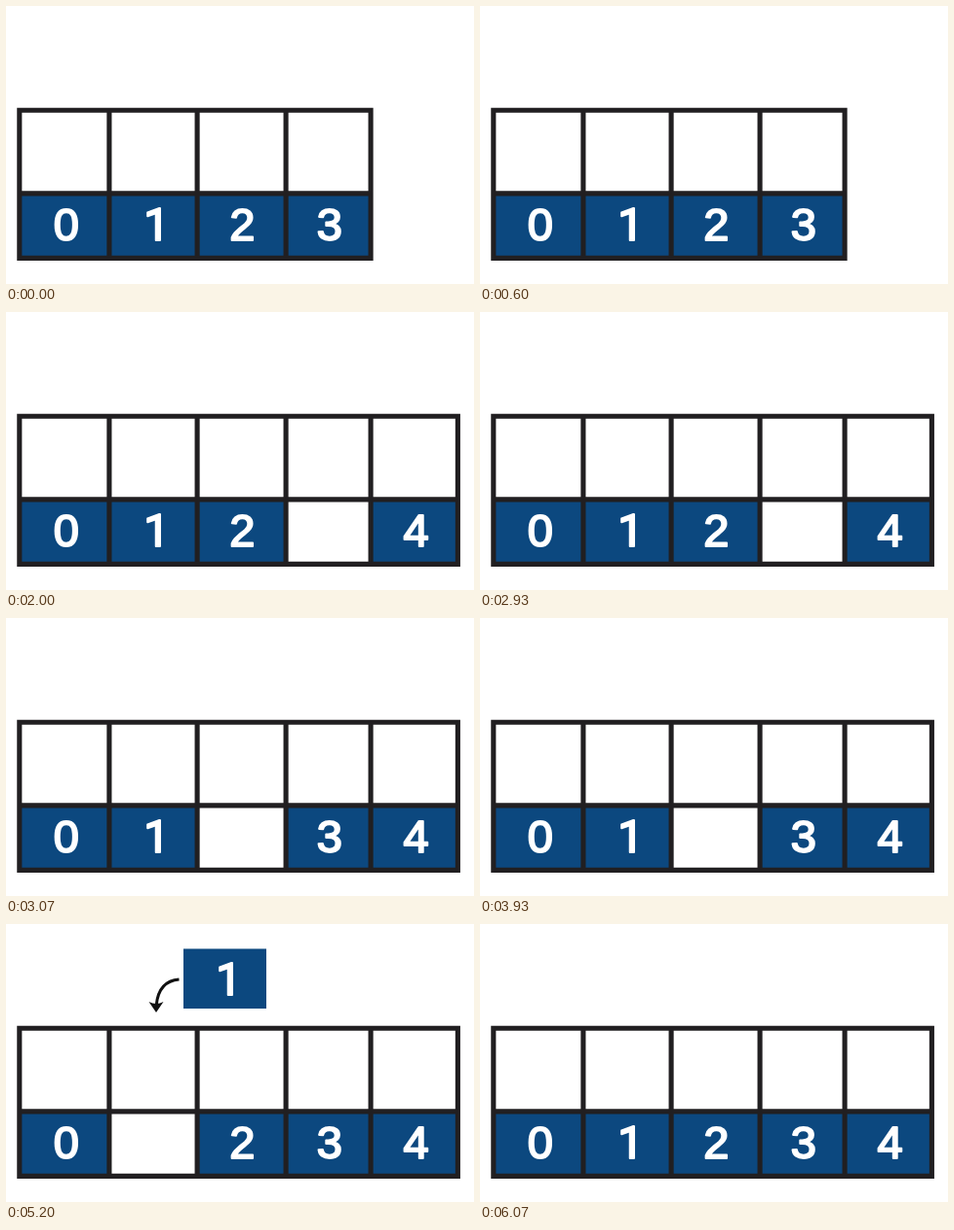
Animation of 480 by 286 pixels, one loop 6.99 s. Source, as an HTML page with a canvas:

```html
<!DOCTYPE html>
<html lang="en">
<head>
<meta charset="utf-8">
<title>Inserting into an array</title>
<style>
html, body { margin: 0; width: 100%; height: 100%; overflow: hidden; background: #fff; }
canvas { display: block; }
</style>
</head>
<body>
<canvas id="stage" width="480" height="286"></canvas>
<script>
const ctx = document.getElementById('stage').getContext('2d');
const LOOP = 6990;
const INK = '#211f21', BLUE = '#0c487f';
const walls = [13.8, 105.9, 196.1, 287.1, 374.1, 463.4];
const rows = [107.2, 192.9, 259.4];
const centers = [61.7, 151.2, 242.2, 331.8, 420.6];
const LINE = 5.1;

// Cell contents from each moment on; a dash is an empty cell.
const steps = [
  [0, '0123'],
  [1000, '0123-'],
  [2000, '012-4'],
  [3000, '01-34'],
  [4000, '0-234'],
  [6000, '01234']
];

function digit(d, x, base) {
  ctx.font = d === '1' ? '47px Roboto, sans-serif'
                       : '47px "Liberation Sans", Arial, sans-serif';
  const m = ctx.measureText(d);
  const left = x - (m.actualBoundingBoxRight - m.actualBoundingBoxLeft) / 2;
  ctx.fillStyle = ctx.strokeStyle = '#fff';
  ctx.lineWidth = 2;
  ctx.lineJoin = 'round';
  ctx.fillText(d, left, base);
  ctx.strokeText(d, left, base);
}

function tile(x, y, w, h) {
  ctx.fillStyle = BLUE;
  ctx.fillRect(x, y, w, h);
}

function grid(cols) {
  const left = walls[0], right = walls[cols];
  const [top, mid, bottom] = rows;
  ctx.strokeStyle = INK;
  ctx.lineWidth = LINE;
  ctx.lineJoin = 'miter';
  ctx.beginPath();
  ctx.rect(left, top, right - left, bottom - top);
  ctx.moveTo(left, mid);
  ctx.lineTo(right, mid);
  for (let i = 1; i < cols; i++) {
    ctx.moveTo(walls[i], top);
    ctx.lineTo(walls[i], bottom);
  }
  ctx.stroke();
}

function arrow() {
  ctx.strokeStyle = ctx.fillStyle = '#111';
  ctx.lineWidth = 3;
  ctx.beginPath();
  ctx.moveTo(177.5, 57);
  ctx.bezierCurveTo(165, 58, 156, 66, 154.3, 83);
  ctx.stroke();
  ctx.beginPath();
  ctx.moveTo(146.5, 80);
  ctx.quadraticCurveTo(154, 84, 161.5, 80);
  ctx.lineTo(154, 91);
  ctx.fill();
}

function draw(t) {
  ctx.fillStyle = '#fff';
  ctx.fillRect(0, 0, 480, 286);
  const cells = steps.filter(s => t >= s[0]).pop()[1];
  [...cells].forEach((d, i) => {
    if (d === '-') return;
    tile(walls[i], rows[1], walls[i + 1] - walls[i], rows[2] - rows[1]);
    digit(d, centers[i], 241.3);
  });
  grid(cells.length);
  if (t >= 5000 && t < 6000) {
    arrow();
    tile(182, 25.5, 85, 61.5);
    digit('1', 225.3, 72.5);
  }
}

const start = performance.now();
function frame() {
  draw((performance.now() - start) % LOOP);
  requestAnimationFrame(frame);
}
frame();
</script>
</body>
</html>
```
